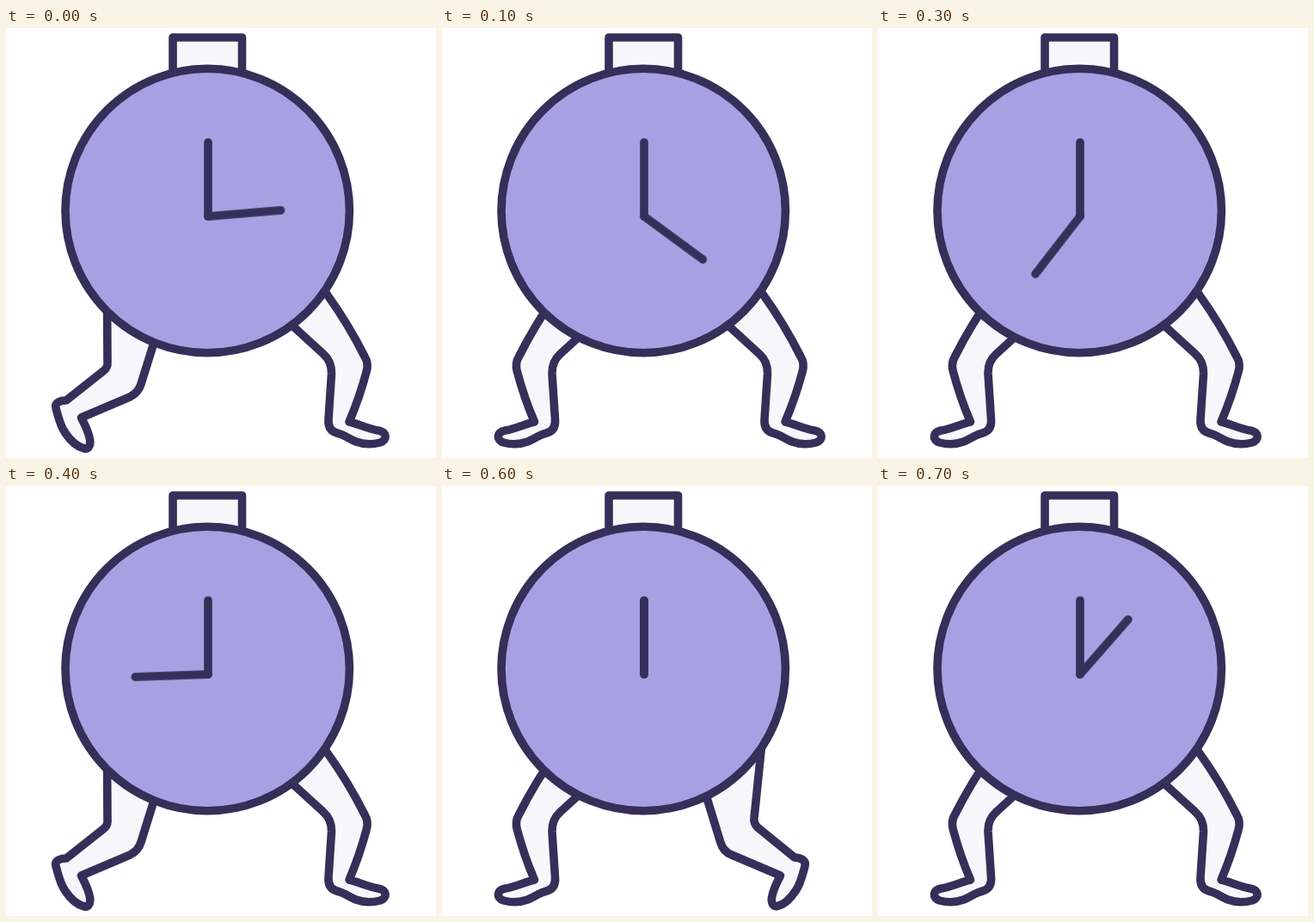
Write an HTML page that moves like this. It is 500x500 px and loops after 800 ms.

```html
<!DOCTYPE html>
<html lang="en">
<head>
<meta charset="utf-8">
<title>Running clock</title>
<style>
  html, body { margin: 0; width: 100%; height: 100%; overflow: hidden; background: #fff; }
  svg { display: block; width: 100%; height: 100%; }
  .ink { fill: #f7f7fb; stroke: #352f59; stroke-width: 9.6; stroke-linecap: round; stroke-linejoin: round; }
  .face { fill: #a7a1e3; }
  .hand { transform-origin: 235px 219px; animation: tick 800ms step-end infinite; }
  .kick { animation: kick 400ms step-end infinite; }
  .stand { animation: stand 400ms step-end infinite; }
  .right { animation-delay: -200ms; }

  @keyframes tick {
    0% { transform: rotate(85.2deg); }
    12.5% { transform: rotate(126.3deg); }
    25% { transform: rotate(180deg); }
    37.5% { transform: rotate(217.8deg); }
    50% { transform: rotate(268deg); }
    62.5% { transform: rotate(317.9deg); }
    75% { transform: rotate(360deg); }
    87.5% { transform: rotate(401.2deg); }
    100% { transform: rotate(445.2deg); }
  }
  @keyframes kick {
    0% { visibility: visible; }
    25%, 100% { visibility: hidden; }
  }
  @keyframes stand {
    0% { visibility: hidden; }
    25%, 100% { visibility: visible; }
  }
</style>
</head>
<body>
<svg viewBox="0 0 500 500">
  <defs>
    <path id="leg" d="M366 299 L372 308 Q398 344 417 382 Q422 390 419 400 Q411 430 399 458
      C409 460 421 466 433 468 C443 470 444 479 435 482 C426 484.500 415 484 407 481
      C398 477 393 473 385 471 Q374 468 375 455 L378.500 402 Q379 388 369 379 L334 347 L320 334 Z"/>
  </defs>
  <g class="ink">
    <use href="#leg" class="stand" transform="translate(506.500 0) scale(-1 1)"/>
    <path class="kick" d="M117.500 310 L118 389 Q118.500 395 113 399 L70 433
      C64 433 56 435 58 442 C61 453 63 463 69 471 C75 480 83 487 91 489
      C97 490.500 99 483 97 476 C95 467 91 460 87.500 453 L144 429 Q154 424 157 414 L171 369 L176 350 Z"/>
    <use href="#leg" class="stand right"/>
    <path class="kick right" d="M373 290 L371 308 L363 386 Q362 392 367 397 L410 432
      C416 432 424 435 422 442 C419 453 417 463 411 471 C405 480 398 487 390 488.500
      C384 489.500 382 483 384 476 C386 467 390 460 393.500 453 L337 429 Q327 425 324 415 L309 366 L303 346 Z"/>
    <path d="M194 60 V11 H274.500 V60"/>
    <circle class="face" cx="234.200" cy="212.500" r="165.200"/>
    <path d="M235 219 V133"/>
    <path class="hand" d="M235 219 V134.200"/>
  </g>
</svg>
</body>
</html>
```
